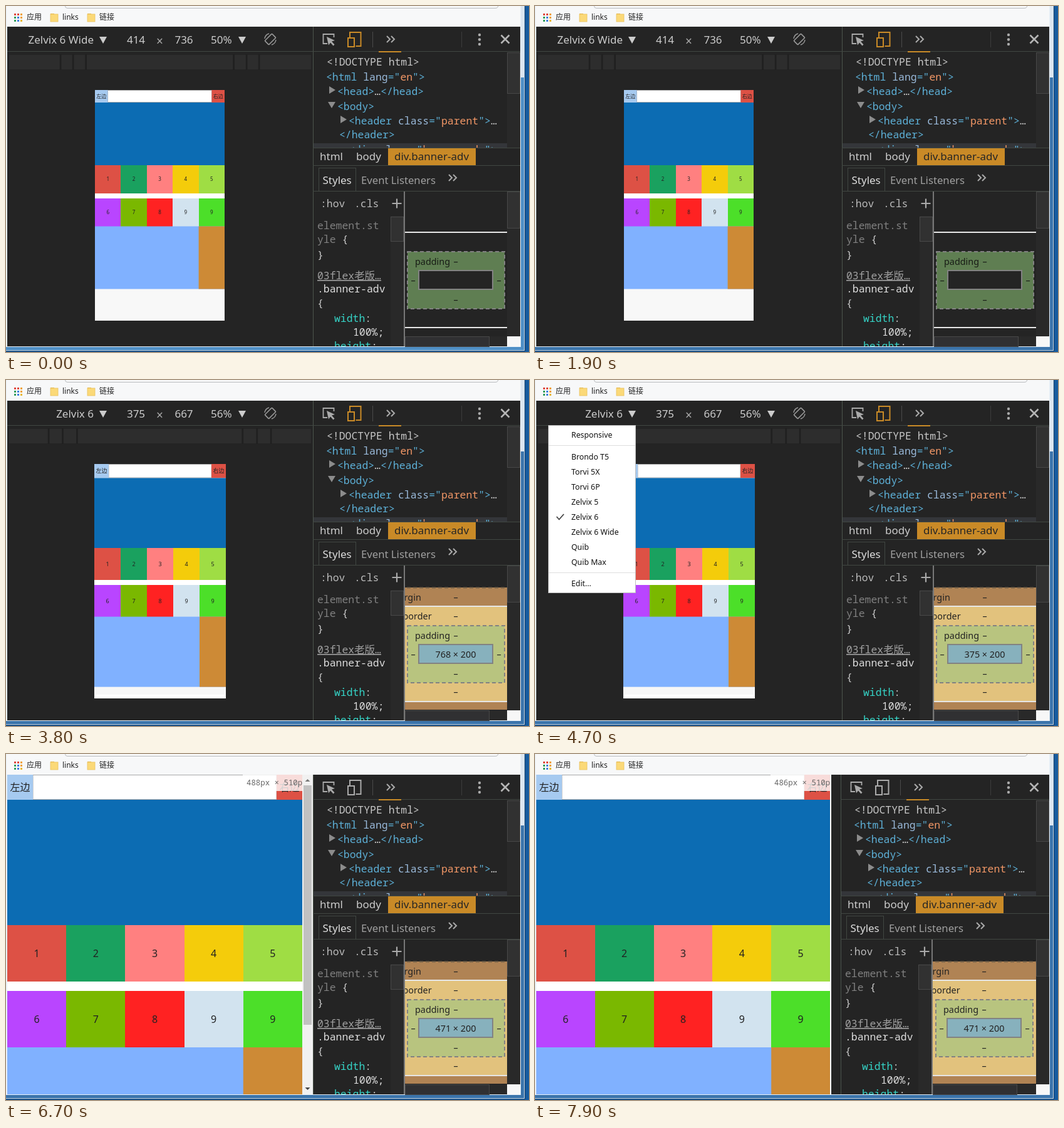
Write an HTML page that moves like this. It is 835x552 px and loops after 8 s.

```html
<!DOCTYPE html>
<html lang="en">
<head>
<meta charset="utf-8">
<title>Responsive page in device mode</title>
<style>
html, body { margin: 0; width: 100%; height: 100%; overflow: hidden; background: #242424; }
svg { display: block; }
text { white-space: pre; font-family: "Noto Sans", "Noto Sans CJK SC", "Noto Sans CJK", sans-serif; }
.mono { font-family: "Noto Sans Mono", "Noto Sans CJK SC", "Noto Sans CJK", monospace; }
</style>
</head>
<body>
<svg id="stage" width="835" height="552" viewBox="0 0 835 552"></svg>
<script>
const LOOP = 8000;
const stage = document.getElementById('stage');
const BG = '#242424', LINE = '#414742', ORANGE = '#c98a27', INK = '#cccccc';
const TAG = '#5db0d7', ATTR = '#9bbbdc', VALUE = '#f29766', TEAL = '#35d4c7';
const CRISP = 'shape-rendering="crispEdges"';
const BODY_ROW = 160;

const devices = {
  plus: { name: 'Zelvix 6 Wide', w: 414, h: 736, zoom: 50, x: 142, right: 349, bottom: 502 },
  tab: { name: 'Quib', w: 768, h: 1024, zoom: 37, x: 104, right: 388, bottom: 513 },
  six: { name: 'Zelvix 6', w: 375, h: 667, zoom: 56, x: 141, right: 351, bottom: 508 },
  five: { name: 'Zelvix 5', w: 320, h: 568, zoom: 50, x: 166, right: 326, bottom: 418 }
};
const menuItems = [['Responsive', 88], ['Brondo T5', 123], ['Torvi 5X', 147], ['Torvi 6P', 171],
  ['Zelvix 5', 195], ['Zelvix 6', 219], ['Zelvix 6 Wide', 243], ['Quib', 267], ['Quib Max', 291], ['Edit...', 325]];

// Value of the last [time, value] step reached at time t.
const at = (t, steps) => steps.reduce((v, [when, next]) => t >= when ? next : v, null);

const tracks = {
  active: [[0, true], [800, false]],
  device: [[0, 'plus'], [2000, 'tab'], [3800, 'six'], [5500, 'five'], [6600, null]],
  model: [[0, 0], [2100, 768], [3900, 375], [5600, 320], [6600, 471]],
  menu: [[0, false], [1000, true], [1900, false], [2900, true], [3800, false], [4700, true], [5400, false]],
  hover: [[0, -1], [1100, 1], [1200, 3], [1300, 5], [1400, 6], [1600, 7],
    [2900, -1], [3000, 0], [3100, 1], [3200, 3], [3300, 4], [3400, 5],
    [4700, -1], [4800, 0], [4900, 1], [5000, 3], [5100, 4]],
  row: [[0, 0], [5900, 113], [6200, 0], [6800, 113], [6900, 183], [7000, BODY_ROW], [7100, 0]],
  tip: [[0, false], [6900, true], [7100, false]],
  size: [[0, 0], [6600, 488], [7400, 0], [7700, 487], [7900, 486]],
  drag: [[0, 0], [7700, -1], [7900, -2]]
};

const esc = s => String(s).replace(/&/g, '&amp;').replace(/</g, '&lt;');
const box = (x, y, w, h, fill, extra = '') =>
  `<rect x="${x}" y="${y}" width="${w}" height="${h}" fill="${fill}" ${extra}/>`;
const path = (d, stroke, width = 1, extra = '') =>
  `<path d="${d}" fill="none" stroke="${stroke}" stroke-width="${width}" ${extra}/>`;
const shape = (d, fill) => `<path d="${d}" fill="${fill}"/>`;
const hline = (x1, x2, y, color = LINE) => box(x1, y, x2 - x1, 1, color);
const vline = (x, y1, y2, color = LINE) => box(x, y1, 1, y2 - y1, color);
const clip = (x, y, w, h, inner) =>
  `<svg x="${x}" y="${y}" width="${w}" height="${h}" viewBox="${x} ${y} ${w} ${h}">${inner}</svg>`;
const move = (dx, inner) => `<g transform="translate(${dx} 0)">${inner}</g>`;

// Text placed by the middle of its line, on a whole-pixel baseline.
const base = (y, size) => Math.round(y + size * 0.36);
const text = (x, y, s, size, fill, extra = '') =>
  `<text x="${x}" y="${base(y, size)}" font-size="${size}" fill="${fill}" ${extra}>${esc(s)}</text>`;
const mid = (x, y, s, size, fill) => text(x, y, s, size, fill, 'text-anchor="middle"');
const code = (x, y, parts, size = 16.45, extra = '') =>
  `<text class="mono" x="${x}" y="${base(y, size)}" font-size="${size}" fill="${parts[0][1]}" ${extra}>` +
  parts.map(([s, fill]) => `<tspan fill="${fill}">${esc(s)}</tspan>`).join('') + '</text>';

function browserFrame(s) {
  const edge = s.active ? '#4f8fc6' : '#3b74ab';
  const dots = ['#e0463c', '#e0463c', '#f0a030', '#2f9e58', '#3f7de0', '#f0a030', '#2f9e58', '#3f7de0', '#e8b82e'];
  const folder = x => box(x, 12, 6, 3, '#e3b755') + box(x, 13, 12, 12, '#fbd978', 'stroke="#e8c15e" stroke-width=".8"');
  return box(0, 0, 835, 552, '#165b9f') +
    box(0, 0, 829, 551, '#1b3f66') + box(0, 0, 828, 550, '#c3dcf0') + box(0, 0, 827, 549, edge) +
    box(822, 0, 5, 114, '#dce6f0') +
    box(0, 0, 822, 544, '#e9f1f8') + box(1, 0, 820, 33, '#f7f8f9') +
    path('M94.5 0Q94.5 3.5 98 3.5H781Q785.5 3.5 785.5 0', '#b9bcbe') +
    dots.map((c, i) => box(13 + i % 3 * 5, 12 + Math.floor(i / 3) * 5, 3, 3, c)).join('') +
    text(33, 18, '应用', 12, '#222') + folder(71) + text(90, 18, 'links', 12, '#222') +
    folder(130) + text(149, 18, '链接', 12, '#222') + box(2, 33, 819, 510, BG);
}

function page(x, y, w, h, z) {
  const top = ['#dd5145', '#1aa15f', '#ff8080', '#f4cc0b', '#9fdd44'];
  const low = ['#b945ff', '#7ab800', '#ff2222', '#d2e3ef', '#4cdf29'];
  const size = 16 * z, cell = w / 5;
  const row = (cy, colors, labels) => colors.map((c, i) =>
    box(x + i * cell, cy, cell, 90 * z, c, CRISP) +
    mid(x + (i + 0.5) * cell, cy + 45 * z, labels[i], size, '#222')).join('');
  return clip(x, y, w, h,
    box(x, y, w, h, z === 0.5 ? '#f8f8f8' : '#fff') +
    (z === 0.37 || z === 0.56 ? box(142, z === 0.37 ? 452 : 489, 207, z === 0.37 ? 50 : 13, '#f7f7f7') : '') +
    box(x + 41 * z, y + 0.5, w - 82 * z, 40 * z - 1, '#fff', 'stroke="#a9a9a9"') +
    box(x, y, 41 * z, 40 * z, '#a6caf0') + mid(x + 20.5 * z, y + 20 * z, '左边', size, '#222') +
    box(x + w - 41 * z, y, 41 * z, 40 * z, '#dd5145') + mid(x + w - 20.5 * z, y + 20 * z, '右边', size, '#222') +
    box(x, y + 40 * z, w, 200 * z, '#0c6cb3') +
    box(x, y + 240 * z, w, 195 * z, '#fff') +
    row(y + 240 * z, top, [1, 2, 3, 4, 5]) + row(y + 345 * z, low, [6, 7, 8, 9, 9]) +
    box(x, y + 435 * z, w, 200 * z, '#80b1ff') + box(x + w * 0.8, y + 435 * z, w * 0.2, 200 * z, '#cd8a36'));
}

function deviceView(d) {
  const z = d.zoom / 100;
  const ticks = [236, 277, 317].flatMap(v => [245.5 - v * z, 245.5 + v * z]);
  const arrow = x => shape(`M${x} 49h12l-6 11z`, INK);
  return hline(2, 490, 72) +
    text(140, 54, d.name, 17, INK, 'text-anchor="end"') + arrow(149) +
    mid(207.5, 54, d.w, 17, INK) + mid(245.5, 56, '×', 19, '#aaa') + mid(284, 54, d.h, 17, INK) +
    text(327, 54, d.zoom + '%', 17, INK) + arrow(371) +
    `<g transform="rotate(45 422 53)">${box(417.5, 45, 9, 16, 'none', 'stroke="#999" stroke-width="1.6" rx="1"')}</g>` +
    path('M413 52a10 10 0 0 1 7-8M431 54a10 10 0 0 1-7 8', '#999', 1.5) +
    box(5, 78, 482, 23, '#2d2d2d') + ticks.map(x => box(x - 1.2, 77, 2.6, 25, '#202020')).join('') +
    page(d.x, 134, d.right - d.x, d.bottom - 134, z);
}

function dockedView(s) {
  const w = 471 + s.drag, right = 2 + w;
  let out = page(2, 33, w, 510, 1);
  if (s.drag) {
    out += box(right, 33, -s.drag, 510, '#fff');
  } else {
    out += box(473, 33, 17, 510, '#f1f1f1') + box(475, 50, 13, 382, '#c1c1c1') +
      shape('M477.5 44h8l-4-4z', '#777') + shape('M477.5 532h8l-4 4z', '#444');
  }
  if (s.tip) {
    out += box(2, 33, w, 40, '#6fa8dc', 'fill-opacity=".66"') +
      shape('M12 82l8.500-8.500l8.500 8.500z', '#333740') +
      box(2.5, 81.5, 161, 25, '#333740', 'rx="2" stroke="#69707a"') +
      code(11, 94, [['header', '#ee78e6'], ['.parent', '#8ed3fb']], 11, 'font-weight="700"') +
      vline(104, 87, 101, '#777') + code(112, 94, [['471×40', '#eee']], 12);
  }
  if (s.size) {
    out += clip(right - 95, 33, 95, 26, box(right - 95, 33, 95, 26, '#fff', 'fill-opacity=".8"') +
      code(right - 89, 46, [[`${s.size}px × 510px`, '#666']], 12.4));
  }
  return out;
}

function toolbar(s) {
  const chevrons = (x, y) => path(`M${x} ${y - 5}l5 5l-5 5M${x + 7} ${y - 5}l5 5l-5 5`, '#aaa', 2);
  const tint = s.device ? ORANGE : '#aaa';
  return move(s.drag,
    path('M513 60h-6.500v-15h17v5', '#aaa', 1.8) + shape('M512 49l13 6l-5 1.500l4.500 5l-2 2l-4.500-5l-3 4z', '#aaa') +
    path('M549 50v-8h17.500v22h-8', tint, 2) + box(546, 51, 10, 14, BG, `stroke="${tint}" stroke-width="2"`) +
    vline(585, 41, 66, '#4a4a4a') + chevrons(608, 53) + box(595, 72, 36, 2, ORANGE) +
    chevrons(707, 274)) +
    vline(727, 41, 66, '#3c3c3c') +
    [46, 53.5, 61].map(y => `<circle cx="756" cy="${y}" r="2.2" fill="#aaa"/>`).join('') +
    path('M790.500 46.500l13 13M803.500 46.500l-13 13', '#b5b5b5', 2.6);
}

function tree(s) {
  const closed = (x, y) => shape(`M${x} ${y - 6}l10 6l-10 6z`, '#8c8c8c');
  const open = (x, y) => shape(`M${x} ${y - 5}h12l-6 10z`, '#8c8c8c');
  return clip(491 + s.drag, 74, 330 - s.drag, 152,
    box(491 + s.drag, 219, 309 - s.drag, 7, '#34363a') +
    move(s.drag,
      (s.row ? box(497, s.row - 11, 299, 22, '#352d22', 'rx="5"') : '') +
      (s.row === BODY_ROW ? vline(521, 172, 226, '#464646') : '') +
      code(512, 89, [['<!DOCTYPE html>', '#c8c8c8']]) +
      code(511, 113, [['<html ', TAG], ['lang', ATTR], ['="', TAG], ['en', VALUE], ['">', TAG]]) +
      closed(516, 134) + code(529, 136, [['<head>', TAG], ['…', INK], ['</head>', TAG]]) +
      open(514, 158) + code(529, BODY_ROW, [['<body>', TAG]]) +
      closed(534, 181) +
      code(547, 183, [['<header ', TAG], ['class', ATTR], ['="', TAG], ['parent', VALUE], ['">', TAG], ['…', INK]]) +
      code(532, 205, [['</header>', TAG]]) +
      code(547, 229, [['<div ', TAG], ['class', ATTR], ['="', TAG], ['banner-adv', VALUE], ['">', TAG]])) +
    box(800, 74, 21, 152, '#292929') + box(800.5, 74.5, 20, 65, '#313131', 'stroke="#484848"'));
}

function crumbs() {
  return text(501, 240, 'html', 17, INK) + text(559, 240, 'body', 17, INK) +
    box(610, 227, 140, 27, ORANGE) + text(620, 240, 'div.banner-adv', 17, '#262626') +
    box(499.5, 258.5, 59, 37, 'none', 'stroke="#414742"') +
    text(505.5, 278, 'Styles', 17, '#ddd') + text(567, 278, 'Event Listeners', 16.7, '#a0a0a0');
}

function styles() {
  return clip(491, 296, 145, 247,
    code(502, 315, [[':hov', '#bbb']], 16.45, 'font-weight="500"') +
    code(556, 315, [['.cls', '#bbb']], 16.45, 'font-weight="500"') +
    path('M616.500 315h15M624 307.500v15', '#aaa', 2.2) +
    code(497, 350, [['element.st', '#808080']]) + code(497, 372, [['yle ', '#808080'], ['{', INK]]) +
    code(497, 397, [['}', INK]]) +
    code(497, 430, [['03flex老版…', '#a0a0a0']], 16.45, 'text-decoration="underline"') +
    code(497, 451, [['.banner-adv', '#ddd']]) + code(497, 474, [['{', INK]]) +
    code(524, 498, [['width', TEAL], [':', INK]]) + code(554, 520, [['100%;', '#ddd']]) +
    code(524, 542, [['height', TEAL], [':', INK]]) +
    box(614, 335, 21, 208, '#292929') + box(614.5, 336.5, 20, 39, '#313131', 'stroke="#484848"')) +
    box(635, 296, 2, 247, '#777');
}

function boxModel(s) {
  const live = s.model > 0, ink = '#222', label = live ? ink : '#171b15';
  const x = 637 + s.drag;
  let inner = '';
  if (live) {
    inner += box(600, 331, 210, 195, '#b08354') + path('M600 331.500H810', '#7c664b', 2, 'stroke-dasharray="6 4"') +
      box(600, 361, 210, 152, '#e2c27d') +
      text(614, 347, 'margin', 14.4, ink) + text(633.5, 377, 'border', 14.4, ink) +
      [347, 377, 498].map(y => mid(718, y, '–', 14.4, ink)).join('');
  }
  inner += box(600, 360, 210, 2, '#e6e6e6') + box(600, 512, 210, 2, '#e6e6e6') +
    box(641, 392, 155, 91, live ? '#b8c47f' : '#5f7e52', 'stroke="#828282" stroke-width="2" stroke-dasharray="6 4"') +
    box(659, 422, 118, 30, live ? '#87b1bd' : BG, 'stroke="#828282" stroke-width="2"') +
    text(653, 408, 'padding', 14.4, label) +
    [[718, 408], [718, 469], [650, 438], [787, 438]].map(([px, y]) => mid(px, y, '–', 14.4, label)).join('') +
    (live ? mid(718, 438, `${s.model} × 200`, 14.4, ink) : '');
  return clip(x, 296, 800 - x, 231, move(s.drag / 2, inner)) +
    box(x, 527, 163 - s.drag, 16, '#292929') + box(x + 0.5, 527.5, 134, 16, '#303032', 'stroke="#484848"') +
    box(800, 296, 21, 231, '#292929') + box(800.5, 296.5, 20, 58, '#313131', 'stroke="#484848"') +
    box(800, 527, 21, 16, '#f7f7f7');
}

function menu(s) {
  const current = devices[s.device].name;
  return box(21.5, 72.5, 139, 267, '#fff', 'stroke="#bdbdbd"') +
    hline(22, 160, 104, '#dedede') + hline(22, 160, 307, '#dedede') +
    menuItems.map(([name, y], i) =>
      (i === s.hover ? box(22, y - 13, 138, 24, '#e8e8e8') : '') +
      text(58, y, name, 12.3, '#111') +
      (name === current ? path(`M34.500 ${y - 1}l4 4.500l7.500-8.500`, '#444', 1.8) : '')).join('');
}

function scene(s) {
  const left = 490 + s.drag;
  return browserFrame(s) + (s.device ? deviceView(devices[s.device]) : dockedView(s)) +
    box(left, 33, 821 - left, 510, BG) + vline(left, 33, 543, '#4c554d') +
    [72, 226, 254, 295].map(y => hline(left, 821, y)).join('') +
    toolbar(s) + tree(s) + move(s.drag, crumbs() + styles()) + boxModel(s) +
    (s.menu ? menu(s) : '');
}

let shown = '';
const start = performance.now();
function frame() {
  const t = (performance.now() - start) % LOOP;
  const state = {};
  for (const key in tracks) state[key] = at(t, tracks[key]);
  const id = JSON.stringify(state);
  if (id !== shown) {
    stage.innerHTML = scene(state);
    shown = id;
  }
  requestAnimationFrame(frame);
}
frame();
</script>
</body>
</html>
```
